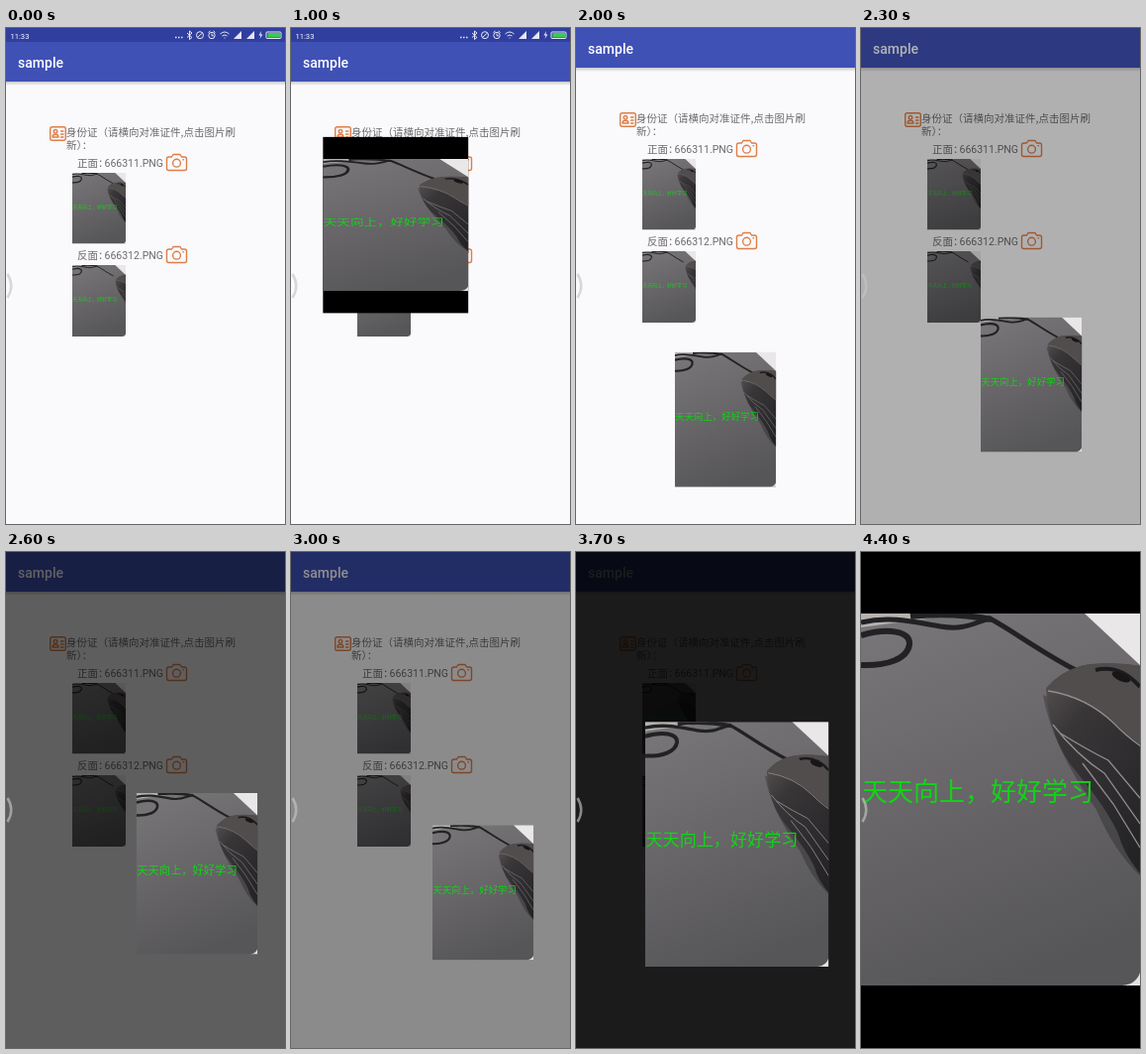
These frames come from a looping animation (282 px wide and 500 px high, 4.5 s). An HTML page:

```html
<!DOCTYPE html>
<html lang="zh-CN">
<head>
<meta charset="utf-8">
<title>sample</title>
<style>
  html, body { margin: 0; width: 100%; height: 100%; overflow: hidden; background: #faf9fb; }
  body > svg { display: block; width: 282px; height: 500px; }
  text { font-family: Roboto, "Noto Sans CJK SC", "Noto Sans CJK", sans-serif; }
  .label { font-size: 10.5px; fill: #6c6a6c; }
  .han { font-family: "Noto Sans CJK SC", "Noto Sans CJK", sans-serif; }
  .icon { fill: none; stroke: #dc7f48; stroke-width: 1.4; stroke-linejoin: round; stroke-linecap: round; }
  .status { fill: none; stroke: #e4e6f5; stroke-width: 1; }
</style>
</head>
<body>
<svg viewBox="0 0 282 500">
  <defs>
    <linearGradient id="cloth" x1=".2" y1="0" x2=".5" y2="1">
      <stop offset="0" stop-color="#777577"/>
      <stop offset=".5" stop-color="#676568"/>
      <stop offset="1" stop-color="#565558"/>
    </linearGradient>
    <linearGradient id="shell" x1="0" y1="0" x2=".6" y2="1">
      <stop offset="0" stop-color="#5b5655"/>
      <stop offset=".3" stop-color="#393638"/>
      <stop offset="1" stop-color="#232224"/>
    </linearGradient>
    <linearGradient id="shade" x1="0" y1="0" x2="0" y2="1">
      <stop offset="0" stop-color="#000" stop-opacity=".2"/>
      <stop offset="1" stop-color="#000" stop-opacity="0"/>
    </linearGradient>

    <g id="desk">
      <rect width="282" height="375" fill="url(#cloth)"/>
      <path d="M0 0H100L60 6L0 14Z" fill="#b5b2b0"/>
      <path d="M226 0H282V52Z" fill="#e9e7e8"/>
      <path d="M282 362V375H264Q278 374 282 362Z" fill="#e4e2e2"/>
      <g fill="none" stroke="#222123" stroke-width="6">
        <path d="M0 9C30 2 55 9 80 13S112 10 130 5C150 15 180 38 217 57" stroke-width="5"/>
        <path d="M0 22C28 14 50 18 49 31C47 46 26 53 0 52"/>
        <path d="M50 3C75 0 100 0 132 6"/>
      </g>
    </g>

    <g id="mouse">
      <path d="M184 82Q192 132 238 198Q256 240 282 264V250L200 90Z" fill="#000" opacity=".25"/>
      <path d="M187 75Q202 58 222 53Q252 47 300 56V280Q268 252 260 222Q248 196 218 160Q190 128 187 75Z" fill="url(#shell)"/>
      <path d="M189 77Q228 83 256 110Q274 128 300 144V56Q252 46 222 53Q202 59 189 77Z" fill="#514d4d"/>
      <path d="M237 57Q262 51 282 74" fill="none" stroke="#1c1b1d" stroke-width="4"/>
      <ellipse cx="263" cy="64" rx="10" ry="4" transform="rotate(24 263 64)" fill="#161517"/>
      <g fill="none" stroke="#918e90" stroke-width="1.3">
        <path d="M189 78Q228 84 256 111Q272 128 300 145"/>
        <path d="M194 112Q218 143 246 161L282 212"/>
        <path d="M202 121Q228 137 250 148L282 186"/>
        <path d="M224 151L255 192L282 236"/>
      </g>
    </g>

    <text id="motto" class="han" x="1" y="189" font-size="26" fill="#12d416">天天向上，好好学习</text>

    <symbol id="photo" viewBox="0 0 282 375" preserveAspectRatio="none">
      <use href="#desk"/><use href="#mouse"/><use href="#motto"/>
    </symbol>
    <symbol id="back" viewBox="0 0 282 375" preserveAspectRatio="none">
      <use href="#desk"/><use href="#mouse" x="42"/><use href="#motto"/>
    </symbol>

    <g id="camera" class="icon">
      <path d="M164.5 130H167.5L169 127.5H176L177.500 130H180.500Q182.500 130 182.500 132V141.500Q182.500 143.500 180.500 143.500H164.500Q162.500 143.500 162.500 141.500V132Q162.500 130 164.500 130Z"/>
      <circle cx="172.500" cy="136.200" r="3.900"/>
      <path d="M179 132.800h.5"/>
    </g>
    <path id="bars" d="M0 8L8 0V8Z" fill="#e4e6f5"/>
  </defs>

  <rect width="282" height="500" fill="#faf9fb"/>

  <g id="page">
    <rect y="14" width="282" height="40" fill="#3f51b5"/>
    <rect y="54" width="282" height="4" fill="url(#shade)"/>
    <text x="12" y="40" font-size="14" font-weight="500" fill="#fff">sample</text>

    <g class="icon">
      <rect x="44.700" y="99.700" width="15.600" height="13.600" rx="2"/>
      <circle cx="50" cy="104.300" r="1.800"/>
      <path d="M47 110Q47 107.300 50 107.300T53 110ZM55.500 104H58M55.500 107H58M55.500 110H58"/>
    </g>
    <text class="label han" x="61" y="109">身份证（请横向对准证件,点击图片刷</text>
    <text class="label han" x="61" y="121.500">新）：</text>

    <text class="label han" x="72" y="139.500">正面：</text>
    <text class="label" x="99.500" y="139.500">666311.PNG</text>
    <use href="#camera"/>
    <use href="#photo" x="67" y="146" width="54" height="71.500"/>

    <text class="label han" x="72" y="232.500">反面：</text>
    <text class="label" x="99.500" y="232.500">666312.PNG</text>
    <use href="#camera" y="93"/>
    <use href="#back" x="67" y="239" width="54" height="72"/>
  </g>

  <g id="status">
    <rect width="282" height="14" fill="#303f9f"/>
    <text x="4.500" y="10.500" font-size="7.600" fill="#fff">11:33</text>
    <g class="status">
      <path d="M171 9.500h1.500m1.500 0h1.500m1.500 0h1.500" stroke-width="1.500"/>
      <path d="M183 5L188 9.500L185.500 11.500V3L188 5L183 9.500"/>
      <circle cx="196" cy="7.200" r="3.500"/><path d="M193.500 9.500L198.500 5"/>
      <circle cx="208" cy="7.500" r="3.200"/><path d="M208 5.500V7.800H210M204.500 4.500L206.500 3M211.500 4.500L209.500 3"/>
      <path d="M216.500 6Q221 2 225.500 6M218.500 8Q221 6 223.500 8M220.500 10h1"/>
      <rect x="263" y="4" width="15" height="6.500" rx="1"/>
    </g>
    <use href="#bars" x="230" y="3"/>
    <use href="#bars" x="243" y="3"/>
    <path d="M258 3L255.500 7.500H257.500L256.500 11L259.500 6.500H257.500Z" fill="#e4e6f5"/>
    <rect x="264.500" y="5" width="13" height="4.500" fill="#35cf4a"/>
  </g>

  <rect id="dim" width="282" height="500"/>
  <g id="viewer">
    <rect id="mat" width="282" height="500"/>
    <use href="#photo" y="62" width="282" height="375"/>
  </g>
  <path d="M1.500 248Q9 260 1.500 272" fill="none" stroke="#c4c4c6" stroke-width="2.500" opacity=".65"/>
</svg>

<script>
const LOOP = 4500, STEP = 100;
const OPEN = 900, OPENED = 1200;
// Centre of the dragged photo: time, x, y
const drag = [
  [1200, 141, 250], [1500, 94, 417.5], [1600, 100, 417], [2000, 151, 395],
  [2600, 193, 324.5], [3400, 195, 362.5], [3900, 141, 250], [4500, 141, 250]
];
const el = id => document.getElementById(id);
const clamp = v => Math.min(1, Math.max(0, v));
const mix = (a, b, k) => a + (b - a) * k;
const ease = k => (1 - Math.cos(Math.PI * k)) / 2;

function place(x, y, sx, sy) {
  el('viewer').setAttribute('transform',
    `translate(${x} ${y}) scale(${sx} ${sy}) translate(-141 -250)`);
}

function dragAt(t) {
  const i = drag.findIndex(p => p[0] > t);
  const [t0, x0, y0] = drag[i - 1], [t1, x1, y1] = drag[i];
  const k = (t - t0) / (t1 - t0);
  return [mix(x0, x1, k), mix(y0, y1, k)];
}

function draw(t) {
  const full = t >= OPENED;
  let dim = 0;
  el('viewer').style.display = t > OPEN ? '' : 'none';
  el('status').style.display = full ? 'none' : '';
  el('mat').style.display = full ? 'none' : '';
  el('page').setAttribute('transform', `translate(0 ${full ? -14 : 0})`);
  if (full) {
    const [x, y] = dragAt(t), drop = y - 250;
    const scale = Math.max(.3625, 1 - drop * .0076);
    dim = clamp(1 - (drop - 33) / 109);
    place(x, y, scale, scale);
  } else {
    const k = ease(clamp((t - OPEN) / (OPENED - OPEN)));
    place(mix(94, 141, k), mix(181.5, 250, k), mix(.361, 1, k), mix(.14, 1, k));
  }
  el('dim').setAttribute('opacity', dim);
}

const start = performance.now();
function tick() {
  const t = (performance.now() - start) % LOOP;
  draw(Math.floor(t / STEP) * STEP);
  requestAnimationFrame(tick);
}
tick();
</script>
</body>
</html>
```
